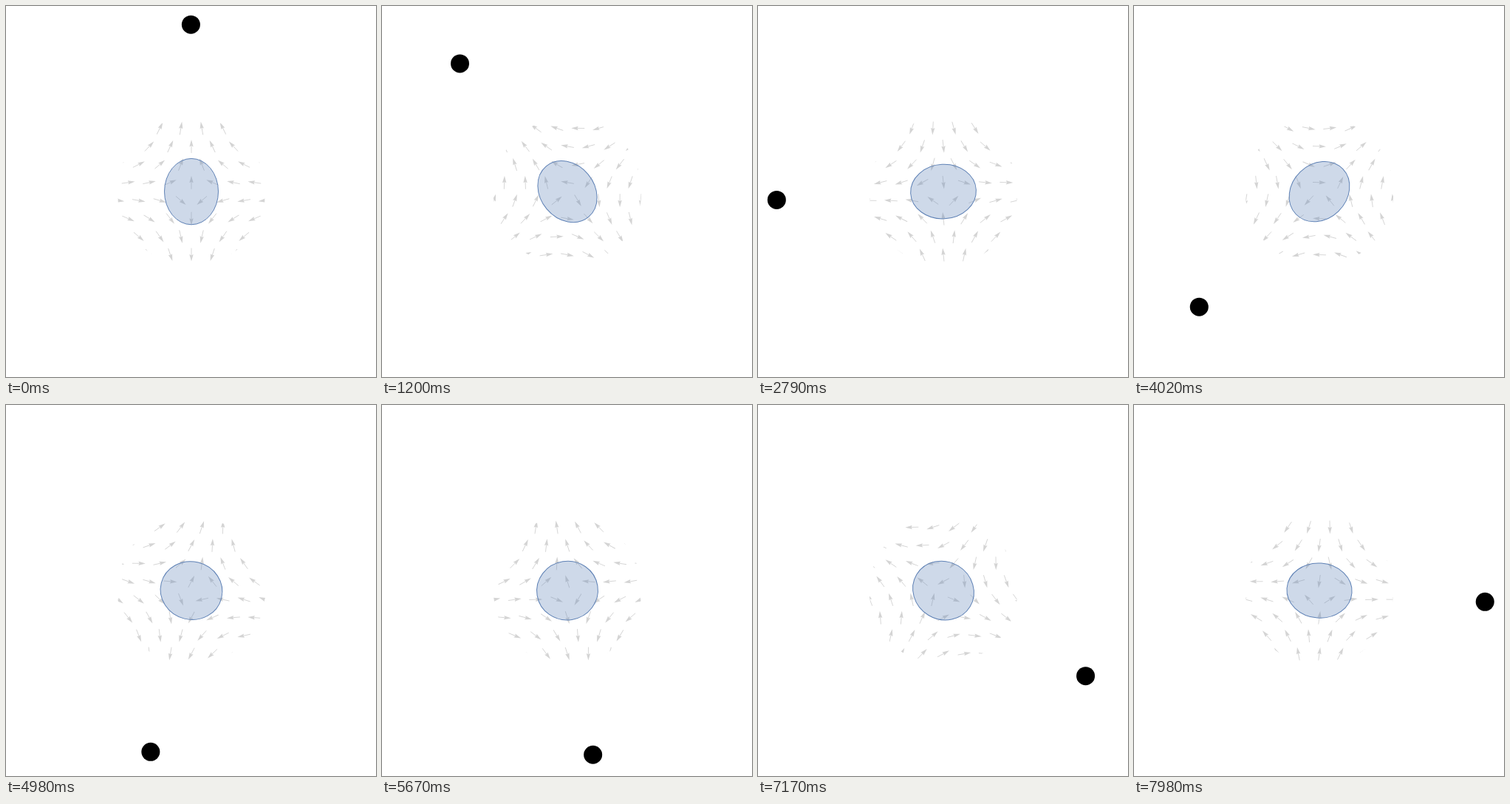
An HTML page for the animation above (8 s loop, 501 by 502 pixels).

```html
<!DOCTYPE html>
<html lang="en">
<head>
<meta charset="utf-8">
<title>Tidal field</title>
<style>
  html, body { margin: 0; width: 100%; height: 100%; overflow: hidden; background: #fff; }
  svg { display: block; width: 100%; height: 100%; }
</style>
</head>
<body>
<svg viewBox="0 0 501 502">
  <defs>
    <clipPath id="disc"><circle cx="251" cy="251" r="100.4"/></clipPath>
    <g id="arrow">
      <path d="M-9 0H1" stroke="#d4d4d4" stroke-width=".9"/>
      <path d="M9 0L-.5 -2.7L.8 0L-.5 2.7Z" fill="#d4d4d4"/>
    </g>
  </defs>
  <g id="field" clip-path="url(#disc)"></g>
  <ellipse id="body" fill="#5e81b5" fill-opacity=".3" stroke="#5e81b5"/>
  <circle id="moon" r="12.5"/>
</svg>
<script>
const LOOP = 8000, STEP = 30, CX = 251, CY = 251;
const DX = 28.45, DY = 24.45;
const field = document.getElementById('field');
const body = document.getElementById('body');
const moon = document.getElementById('moon');

// Bulge along the moon's axis: [orbit angle, stretch]
const bulge = [[0, 4.1], [40, 4.1], [93, 3.8], [134, 3.5], [166, -1.4], [213, -.2], [266, 3.5]];

function stretch(deg) {
  const i = Math.max(1, bulge.findIndex(p => p[0] >= deg));
  const [a, from] = bulge[i - 1], [b, to] = bulge[i];
  const u = (deg - a) / (b - a);
  return from + (to - from) * u * u * (3 - 2 * u);
}

// Staggered grid; the disc clips arrows on its rim
const arrows = [];
for (let row = -4; row < 4; row++) {
  for (let col = -4; col <= 4; col++) {
    const x = (col + (row % 2 ? 0 : .5)) * DX, y = (row + .5) * DY;
    if (Math.hypot(x, y) > 110) continue;
    const el = document.createElementNS('http://www.w3.org/2000/svg', 'use');
    el.setAttribute('href', '#arrow');
    field.append(el);
    arrows.push({ x, y, el });
  }
}

function set(el, attrs) {
  for (const key in attrs) el.setAttribute(key, attrs[key]);
}

function draw(ms) {
  const deg = Math.floor(ms % LOOP / STEP);
  const a = deg * Math.PI / 180;
  const c = Math.cos(2 * a), s = Math.sin(2 * a);

  for (const { x, y, el } of arrows) {
    const dir = Math.atan2(s * x + c * y, s * y - c * x) * 180 / Math.PI;
    el.setAttribute('transform', `translate(${CX + x} ${CY + y}) rotate(${dir})`);
  }
  const d = stretch(deg);
  set(body, { rx: 40.6 - d, ry: 40.6 + d, transform: `translate(${CX} 251.1) rotate(${-deg})` });
  set(moon, { cx: 250.4 - 225.4 * Math.sin(a), cy: 250.6 - 225.4 * Math.cos(a) });
}

let start;
function tick(now) {
  start ??= now;
  draw(Math.max(0, now - start));
  requestAnimationFrame(tick);
}
draw(0);
requestAnimationFrame(tick);
</script>
</body>
</html>
```
